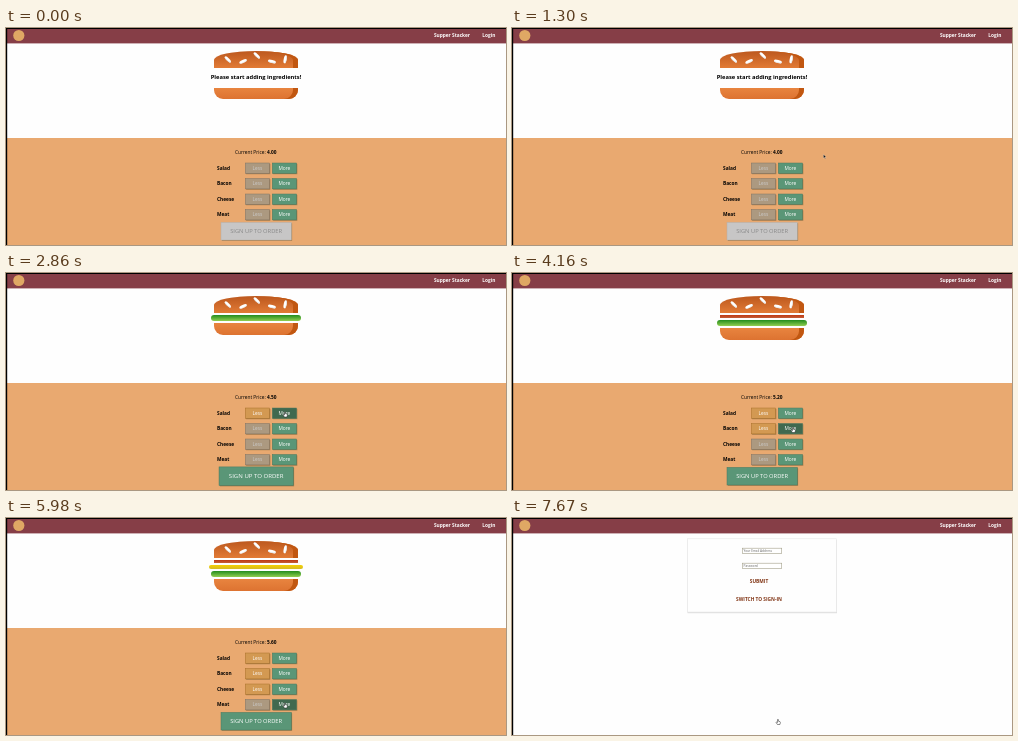
Recreate the animation shown at these times as an HTML page. Size 500 by 217 pixels, loop 8 s.

```html
<!DOCTYPE html>
<html lang="en">
<head>
<meta charset="utf-8">
<title>Sandwich order</title>
<style>
html, body { margin: 0; width: 100%; height: 100%; overflow: hidden; background: #fefefe; }
body { position: relative; font: 4.8px "Open Sans", sans-serif; }
svg { position: absolute; left: 0; top: 0; width: 500px; height: 217px; }
text { font-size: 4.8px; }
.bold { font-weight: 700; }
.mid { text-anchor: middle; }
.big { font-size: 5.75px; }
.tiny { font-size: 3.2px; fill: #666; }
.link { font-weight: 700; text-anchor: middle; fill: #803414; }

#burger { position: absolute; left: 197.5px; top: 22.5px; width: 105px; }
#burger > div { margin: 2.1px auto; }
#burger > .top { position: relative; width: 84px; height: 17.6px; margin-top: 0;
  border-radius: 50% 50% 0 0; background: linear-gradient(#bc581e, #e27b36);
  box-shadow: inset -5px 0 #c15711; }
.top i { position: absolute; width: 8px; height: 2.6px; margin: -1.3px -4px;
  border-radius: 50%; background: #fff; box-shadow: inset -.5px -.6px #ddd; }
.empty { height: 15.7px; line-height: 15.7px; font-size: 5.76px; font-weight: 700;
  text-align: center; white-space: nowrap; }
.bacon { width: 84px; height: 2.6px; background: linear-gradient(#bf3813, #c45e38); }
.cheese { width: 94.5px; height: 4.2px; border-radius: 7px; background: linear-gradient(#f4d004, #d6bb22); }
.meat { width: 84px; height: 7px; border-radius: 5px; background: linear-gradient(#7f3608, #702e05); }
.salad { width: 89.3px; height: 6.2px; border-radius: 7px; background: linear-gradient(#228c1d, #91ce50); }
.bottom { width: 84px; height: 11.5px; border-radius: 0 0 9px 9px;
  background: linear-gradient(#e8843f, #dd7331); box-shadow: inset -5px 0 #c15711; }

.shade { fill: #8a6a3c; opacity: .75; }
.button rect:last-of-type { stroke-width: .5; }
.less rect:last-of-type { fill: #d39952; stroke: #a8702a; }
.more rect:last-of-type, .order rect:last-of-type { fill: #5a9677; stroke: #47785f; }
.button text { fill: #fff; text-anchor: middle; }
.less.off rect:last-of-type { fill: #ac9980; stroke: #7e7365; }
.less.off text { fill: #ccc; }
.order.off rect:last-of-type { fill: #c7c6c6; stroke: #b5b0aa; }
.order.off text { fill: #888; }
.button.hover rect:last-of-type { fill: #40694f; }
.order.hover rect:last-of-type { stroke: #a6831f; }
</style>
</head>
<body>
<svg viewBox="0 0 500 217">
  <g id="builder">
    <rect y="110" width="500" height="107" fill="#e9a970"/>
    <text x="229" y="126">Current Price: <tspan class="bold" id="price"></tspan></text>
    <g id="controls"></g>
  </g>
  <g id="auth">
    <rect x="175.5" y="22" width="149.5" height="73.2" fill="#ccc" opacity=".6"/>
    <rect x="175.5" y="20.8" width="149" height="73.2" fill="#fefefe" stroke="#e6e6e6" stroke-width=".6"/>
    <g fill="#fff" stroke="#a3a08a" stroke-width=".6">
      <rect x="230.3" y="30.2" width="39.4" height="5.4"/>
      <rect x="230.3" y="45.2" width="39.4" height="5.2"/>
    </g>
    <text class="tiny" x="231.5" y="34.1">Your Email Address</text>
    <text class="tiny" x="231.5" y="49">Password</text>
    <text class="link" x="247" y="64.8">SUBMIT</text>
    <text class="link" x="247" y="83.2">SWITCH TO SIGN-IN</text>
  </g>
  <rect width="500" height="15.4" fill="#863e47"/>
  <circle cx="12.8" cy="7.5" r="5.6" fill="#dfa864"/>
  <g class="bold" fill="#fff">
    <text x="464" y="9.2" text-anchor="end">Supper Stacker</text>
    <text x="476.3" y="9.2">Login</text>
  </g>
  <path d="M0 0H500V1H1.2V217H0Z"/>
</svg>

<div id="burger">
  <div class="top"></div>
  <div class="empty">Please start adding ingredients!</div>
  <div class="bacon"></div>
  <div class="cheese"></div>
  <div class="meat"></div>
  <div class="salad"></div>
  <div class="bottom"></div>
</div>

<svg viewBox="0 0 500 217">
  <g id="cursor" stroke-linejoin="round">
    <path id="arrow" d="M0 0V3.6L.9 2.8 1.5 4.2 2.1 3.9 1.5 2.6H2.6Z" fill="#111" stroke="#fff" stroke-width=".25"/>
    <path id="hand" d="M-.5 -2Q0 -2.6 .4 -2V-.3L2 .1Q2.6 .4 2.4 1.2L1.9 3H-.6L-1.9 1Q-1.9 .3 -1.2 .5L-.5 1Z"
      fill="#fff" stroke="#222" stroke-width=".5"/>
  </g>
</svg>

<script>
const LOOP = 8000, STEP = 130, AUTH_AT = 7410;
const $ = id => document.getElementById(id);

const items = [
  { name: 'Salad', at: 2860, cost: 0.5 },
  { name: 'Bacon', at: 4160, cost: 0.7 },
  { name: 'Cheese', at: 5330, cost: 0.4 },
  { name: 'Meat', at: 6110, cost: 1.3 }
];

// time, x, y
const path = [
  [390, 336, 223], [1300, 311.5, 126.5], [1560, 311.5, 126.5], [2470, 284, 146],
  [2600, 279, 141], [3380, 279, 141], [3640, 281, 156.5], [4550, 281, 156.5],
  [5070, 279, 171.5], [5590, 279, 171.5], [5850, 279, 187], [6370, 279, 187],
  [6890, 266, 203.5]
];

// x, y, angle
const seeds = [[13.5, 8.7, 45], [28.5, 10.8, -25], [43.3, 4.3, 45], [58, 10.4, 15], [71, 8.6, -78]];
document.querySelector('.top').innerHTML = seeds.map(([x, y, a]) =>
  `<i style="left:${x}px;top:${y}px;transform:rotate(${a}deg)"></i>`).join('');

function button(kind, label, x, y, w, h) {
  const g = document.createElementNS('http://www.w3.org/2000/svg', 'g');
  const box = `width="${w}" height="${h}"`;
  const big = kind === 'order';
  g.innerHTML = `<rect class="shade" x="${x + .8}" y="${y + .8}" ${box}/>
    <rect x="${x}" y="${y}" ${box}/>
    <text class="${big ? 'big' : ''}" x="${x + w / 2}" y="${y + h / 2 + (big ? 2.1 : 1.7)}">${label}</text>`;
  $('controls').append(g);
  return (off, cx, cy) => {
    const hover = !off && cx > x && cx < x + w && cy > y && cy < y + h;
    g.setAttribute('class', `button ${kind}${off ? ' off' : ''}${hover ? ' hover' : ''}`);
    return g;
  };
}

items.forEach((item, i) => {
  const y = 140.2 + 15.5 * i;
  $('controls').insertAdjacentHTML('beforeend',
    `<text class="bold" x="211" y="${y + 1.6}">${item.name}</text>`);
  item.less = button('less', 'Less', 239.3, y - 5.2, 24.2, 10.4);
  item.more = button('more', 'More', 266.3, y - 5.2, 24.2, 10.4);
  item.layer = document.querySelector('.' + item.name.toLowerCase());
});
const order = button('order', 'SIGN UP TO ORDER', 215, 194.4, 70.3, 17.6);

function cursorAt(t) {
  const next = path.findIndex(p => p[0] > t);
  if (next < 1) return (next ? path[path.length - 1] : path[0]).slice(1);
  const [a, b] = [path[next - 1], path[next]];
  const u = (t - a[0]) / (b[0] - a[0]), e = u * u * (3 - 2 * u);
  return [a[1] + (b[1] - a[1]) * e, a[2] + (b[2] - a[2]) * e];
}

function pulse(t) {
  const e = t - items[0].at + 100;
  if (e < 100 || e > 300) return 1;
  return 1 + 0.1 * (e < 180 ? e / 180 : (300 - e) / 120);
}

function draw(now) {
  const t = Math.floor(now % LOOP / STEP) * STEP;
  const [x, y] = cursorAt(t);
  const auth = t >= AUTH_AT, empty = t < items[0].at;
  let price = 4;
  for (const item of items) {
    const added = t >= item.at;
    if (added) price += item.cost;
    item.layer.style.display = added ? '' : 'none';
    item.less(!added, x, y);
    item.more(false, x, y);
  }
  $('price').textContent = price.toFixed(2);
  document.querySelector('.empty').style.display = empty ? '' : 'none';
  order(empty, x, y).setAttribute('transform',
    `translate(250.1 203.2) scale(${pulse(t)}) translate(-250.1 -203.2)`);
  $('builder').style.display = $('burger').style.display = auth ? 'none' : '';
  $('auth').style.display = auth ? '' : 'none';

  const pointing = auth || document.querySelector('.hover');
  $('hand').style.display = pointing ? '' : 'none';
  $('arrow').style.display = pointing ? 'none' : '';
  $('cursor').setAttribute('transform', `translate(${x} ${y})`);
}

const start = performance.now();
function tick() {
  draw(performance.now() - start);
  requestAnimationFrame(tick);
}
tick();
</script>
</body>
</html>
```
